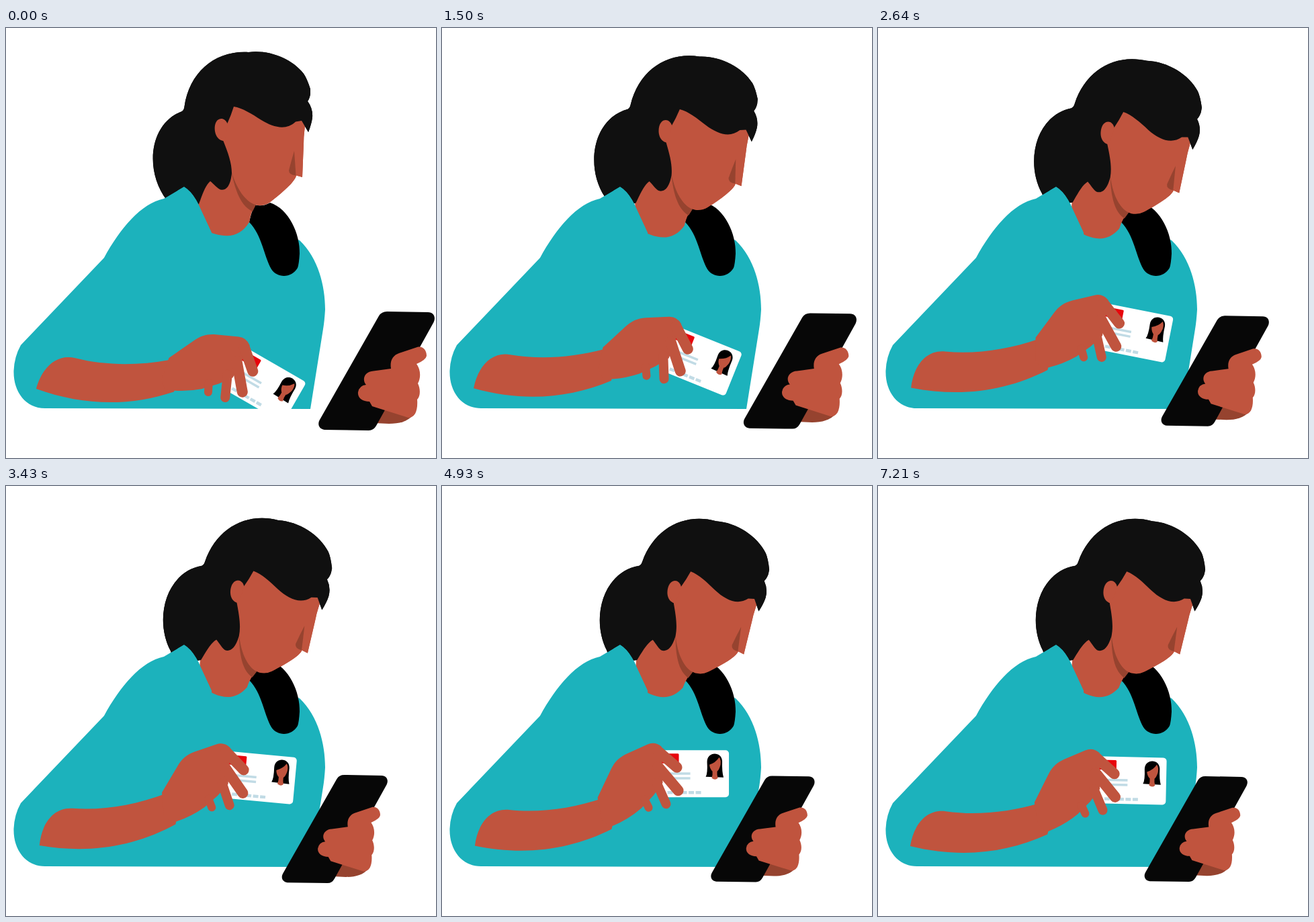
Recreate the animation shown at these times as an HTML page. Size 640 by 640 pixels, loop 9.64 s.

```html
<!DOCTYPE html>
<html lang="en">
<head>
<meta charset="utf-8">
<title>Scanning a card</title>
<style>
  html, body { margin: 0; width: 100%; height: 100%; overflow: hidden; background: #fff; }
  svg { display: block; width: 100vw; height: 100vh; }
  .skin { fill: #c0543e; }
  .shade { fill: #96432f; }
  .hair { fill: #101010; }
  .ink { fill: #c1dbe5; }
  .finger { stroke: #c0543e; stroke-linecap: round; fill: none; }
</style>
</head>
<body>
<svg viewBox="0 0 640 640">
  <defs>
    <clipPath id="collar">
      <path d="M0 0H640V640H320L306 304L286 261Q277 243 265 236L235 254L146 342H0Z"/>
    </clipPath>
    <g id="head">
      <path class="skin" d="M304 224Q289 238 286 262L290 298C326 316 348 312 362 289Q364 274 371 263L340 200Z"/>
      <path class="shade" d="M335 212C341 232 352 257 372 263L367 273C349 265 341 241 335 212Z"/>
      <path class="skin" d="M336 110L446 130L444.500 150Q443 162 443 172L441 222L432 219.500C430 230 406 249 394 258.500Q387 264 376 264C353 261 347 235 336 214L322 165Z"/>
      <path class="shade" d="M429 183L431.500 219.500Q421 219 421 212Q425 196 429 183Z"/>
      <path class="hair" d="M240 257C206.500 215 211.500 143 262 124Q265 122 265.500 117C273 65 312 33 361 36C392 32 426 46 443 68Q448 75 453 91V98Q452 105 449 109Q457 120 456 133Q455 142 450 155L440 138L431 139.500C417 153 398 148 380 137C366 128 352 119 339 117Q335 130 329 143L323 167C331 187 336 201 336 216C334 238 326 242 319 240.500C314 238 310 233 304 228C297 234 293 246 287 262L270 268H246Z"/>
      <path class="skin" d="M330 143C325 131 313 133 311 145C309 158 316 169 326 168Z"/>
    </g>
  </defs>

  <use href="#head"/>
  <path fill="#1cb2bc" d="M235 254L265 236Q277 243 286 261L306 304C326 309 348 304 362 289L437 316C465 343 475 384 475 419Q474 436 472 448L453 567L58 566C29 566 11 541 11.500 511Q12 490 22 472L146 342C170 298 201 261 235 254Z"/>
  <path d="M362 289Q365 273 371 263.500Q383 266 393 260C421 269 438 307 437 336Q436 352 434 357C425 373 403 372 395 359C384 340 381 308 362 289Z"/>
  <g clip-path="url(#collar)"><use href="#head"/></g>

  <g id="arm">
    <path class="skin" d="M45 537C53 507 74 484 103 491C147 502 196 502 243 493L262 510L250 540.500C186 562 118 563 45 537Z"/>
  </g>

  <g id="hand">
    <rect x="321" y="393.500" width="106.500" height="70" rx="5" fill="#fff"/>
    <rect x="326" y="398.500" width="27" height="14.500" rx="1.500" fill="#e8050c"/>
    <path class="ink" d="M332 426.500H370V430H332ZM332 433.500H370V437H332Z"/>
    <path d="M336 456.500H386" stroke="#c1dbe5" stroke-width="4.500" stroke-dasharray="8 2.500"/>
    <path d="M393 433Q396 428 395 411C395 395 417 395 417.500 410Q417 426 419.500 434L393 433Z"/>
    <path class="skin" d="M398.500 415Q408 412 413 404Q416 408 415 415Q413 423 410 425V430L411 435Q407 439 402 435L403 430V425Q399 421 398.500 415Z"/>
    <path class="skin" d="M232 464L251 424C257 411 263 405 275 399L306 385Q317 380 327 388L328 412L329 442L315 461L297 480Q276 498 250 508L238 497Z"/>
    <path class="finger" stroke-width="16" d="M321 394L350 419M322 418L352 453.500"/>
    <path class="finger" stroke-width="14" d="M320 442L334 473.500"/>
    <path class="finger" stroke-width="12" d="M302 467L308 479"/>
  </g>

  <g id="phone">
    <path class="shade" d="M556 566L607 575C598 586 585 589 570 589L548 588Z"/>
    <path fill="#070707" d="M567 422L628 423C637 423 640 431 636.500 438L551 592Q547 599 540 599L474 598C466 597 463 590 467 583L555 428.500Q559 422 567 422Z"/>
    <path class="skin" d="M573 507C571 495 576 487 585 484L612 475C620 473 626 479 626 488Q625 494 611 500C617 508 618 520 613 529C617 537 617 548 612 553Q613 566 609 574Q605 580 599 580L545 563L541 556C530 556 523 550 524 542Q526 532 536 531C529 523 534 511 547 510.500Z"/>
  </g>
</svg>
<script>
const LOOP = 9640, FPS = 14, LAST = 101;
const ELBOW = [36, 508], REACH = 205.5;
const byId = id => document.getElementById(id);

// Ease with control points (1/3, 0) and (1/6, 1)
function ease(x) {
  if (x >= 1) return 1;
  let lo = 0, hi = 1, u = 0.5;
  for (let i = 0; i < 24; i++) {
    u = (lo + hi) / 2;
    const v = 1 - u;
    if (u * v * v + u * u * v / 2 + u * u * u < x) lo = u; else hi = u;
  }
  return u * u * (3 - 2 * u);
}

// Smooth curve through [seconds, value] points, level at peaks and ends
function curve(pts) {
  const rate = pts.slice(1).map((p, i) => (p[1] - pts[i][1]) / (p[0] - pts[i][0]));
  const slope = pts.map((_, i) => {
    const a = rate[i - 1] || 0, b = rate[i] || 0;
    return a * b > 0 ? 2 * a * b / (a + b) : 0;
  });
  return t => {
    if (t >= pts[pts.length - 1][0]) return pts[pts.length - 1][1];
    const i = pts.findIndex(p => p[0] > t) - 1;
    const [t0, a] = pts[i], [t1, b] = pts[i + 1];
    const d = t1 - t0, u = (t - t0) / d, v = 1 - u;
    return a * v * v * (1 + 2 * u) + b * u * u * (3 - 2 * u)
      + d * u * v * (slope[i] * v - slope[i + 1] * u);
  };
}

const armLift = curve([[0, -0.25], [1, 2], [1.93, 6], [3.43, 9.8], [4.93, 7.9], [6.21, 5.95], [7, 5.85]]);
const cardTilt = curve([[0, 29.9], [1, 26.1], [1.93, 17.8], [3.43, 5.3], [4.93, 0], [6.21, 0.9], [7, 1.2]]);

function draw(ms) {
  const tick = Math.floor(ms / 10) * 10 + 5;
  const t = Math.min(LAST, Math.floor(tick * FPS / 1000)) / FPS;
  const set = (id, value) => byId(id).setAttribute('transform', value);

  set('head', `rotate(${11.5 * ease(t / 5)} 304 277)`);

  const p = ease(t / 7), s = 1 - 0.113 * p;
  set('phone', `matrix(${s} 0 0 ${s} ${-16 * p} ${57.7 * p})`);

  const lift = armLift(t), rad = lift * Math.PI / 180;
  const x = ELBOW[0] + REACH * Math.cos(rad), y = ELBOW[1] - REACH * Math.sin(rad);
  set('arm', `rotate(${-lift} ${ELBOW})`);
  set('hand', `translate(${x} ${y}) rotate(${cardTilt(t)}) translate(-240 -480)`);
}

const start = performance.now();
function frame() {
  draw((performance.now() - start) % LOOP);
  requestAnimationFrame(frame);
}
draw(0);
requestAnimationFrame(frame);
</script>
</body>
</html>
```
